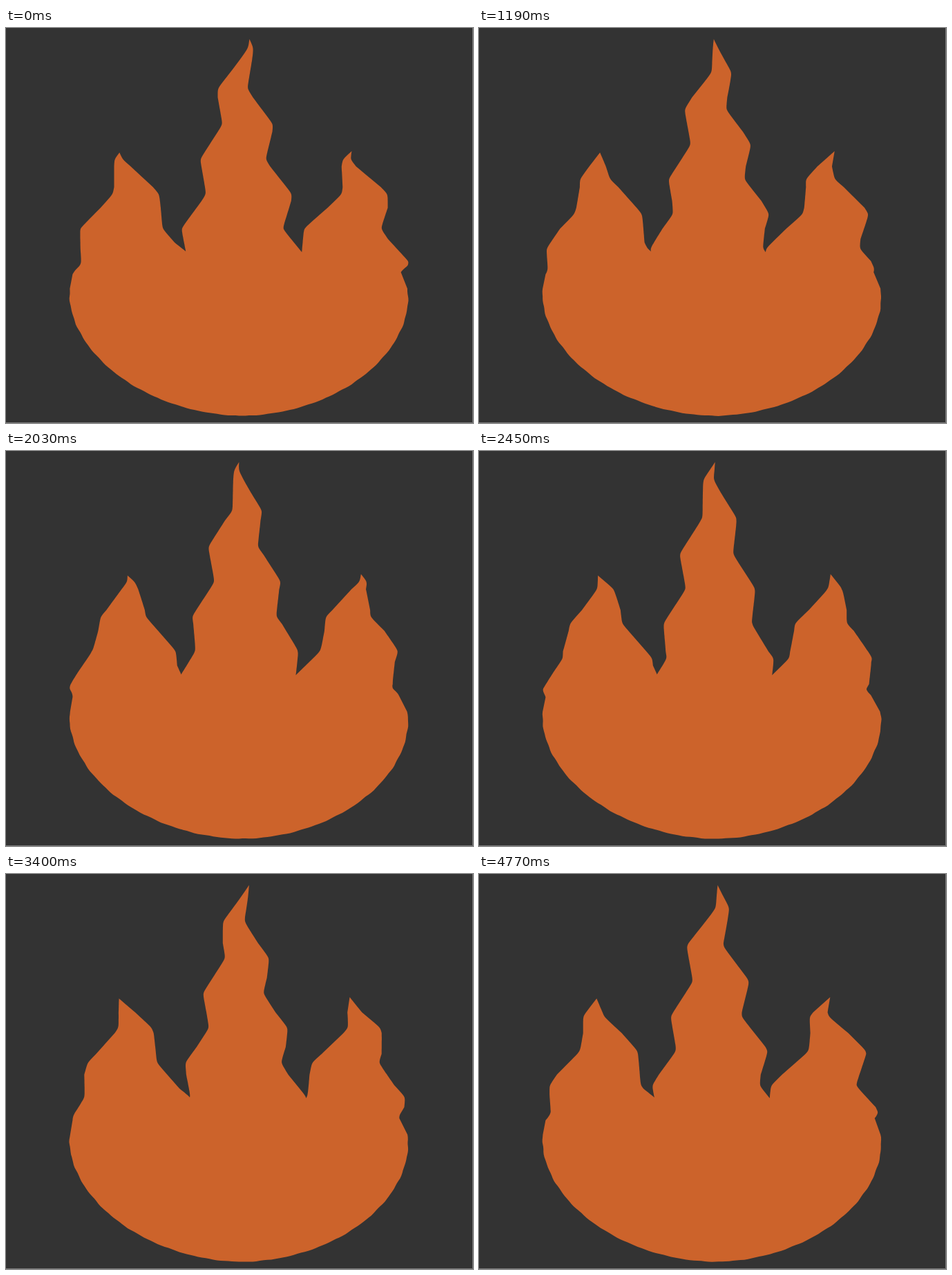
Animation, 676 px wide and 571 px high, one loop 4.79 s. Source, as an HTML page:

```html
<!DOCTYPE html>
<html lang="en">
<head>
<meta charset="utf-8">
<title>Flame</title>
<style>
html, body { margin: 0; width: 100%; height: 100%; overflow: hidden; background: #333; }
svg { display: block; width: 676px; height: 571px; }
</style>
</head>
<body>
<svg viewBox="0 0 676 571">
  <path id="flame" fill="#cc632b"/>
  <path d="M675.5 0V570.5H0" fill="none" stroke="#777"/>
</svg>
<script>
const LOOP = 4790;
const WAVE = 100;      // px between ripples
const SINK = 0.0243;   // px per ms the ripples move down
const START = 84;      // height of a ripple's leftmost point at time 0

// Resting outline of the three tongues, left to right.
const tongues = [
  [96, 358], [99, 345], [106, 320], [116, 290], [135, 260], [151, 230], [162, 200],
  [170, 180],
  [186, 200], [207, 230], [222, 260], [246, 310], [257, 323],
  [264, 290], [277, 250], [289, 200], [312, 100], [328, 60],
  [345, 16],
  [354, 60], [363, 100], [379, 150], [389, 200], [406, 250], [412, 290], [424, 324],
  [443, 290], [463, 260], [480, 230], [493, 200],
  [507, 178],
  [514, 200], [535, 230], [550, 260], [558, 305], [571, 337], [570, 353]
];

const flame = document.getElementById("flame");
const mix = (a, b, w) => a + (b - a) * w;

// Triangle wave with slightly rounded corners, -1 to 1, lowest at phase 0.
const ripple = phase => -Math.asin(0.98 * Math.cos(2 * Math.PI * phase)) / Math.asin(0.98);

// One field pushes every edge sideways; it fades where the tongues meet the bowl.
function push(x, y, t) {
  const lag = 6 - 24 * Math.exp(-y / 40);
  const fade = Math.max(0, Math.min(1, (356 - y) / 12));
  const size = 7 + x / 125;
  return x + size * fade * ripple((y - START - lag - SINK * t) / WAVE);
}

function edges(t) {
  const out = [];
  for (let i = 1; i < tongues.length; i++) {
    const [x0, y0] = tongues[i - 1], [x1, y1] = tongues[i];
    const n = Math.ceil(Math.abs(y1 - y0) / 2);
    for (let k = i > 1 ? 1 : 0; k <= n; k++) {
      const x = mix(x0, x1, k / n), y = mix(y0, y1, k / n);
      out.push([push(x, y, t), y]);
    }
  }
  return out;
}

// The bowl: a slightly pointed, slightly skewed ellipse with a rough rim.
function bowl(t) {
  const out = [], over = 0.075, steps = 140;
  const bend = v => Math.sign(v) * Math.abs(v) ** (2 / 1.9);
  for (let i = 0; i <= steps; i++) {
    const a = mix(-over, Math.PI + over, i / steps);
    const r = 1 + 0.0012 * (Math.sin(a * 31 + t / 310) + Math.sin(a * 53 - t / 230));
    const u = r * bend(Math.cos(a)), v = r * bend(Math.sin(a));
    out.push([337 + 245 * u + 5 * v, 388 + 172.5 * v]);
  }
  return out;
}

function draw(t) {
  const pts = [...edges(t), ...bowl(t)];
  flame.setAttribute("d", "M" + pts.map(p => p.map(v => v.toFixed(1)).join(" ")).join("L") + "Z");
}

const begin = performance.now();
function tick() {
  draw((performance.now() - begin) % LOOP);
  requestAnimationFrame(tick);
}
tick();
</script>
</body>
</html>
```
